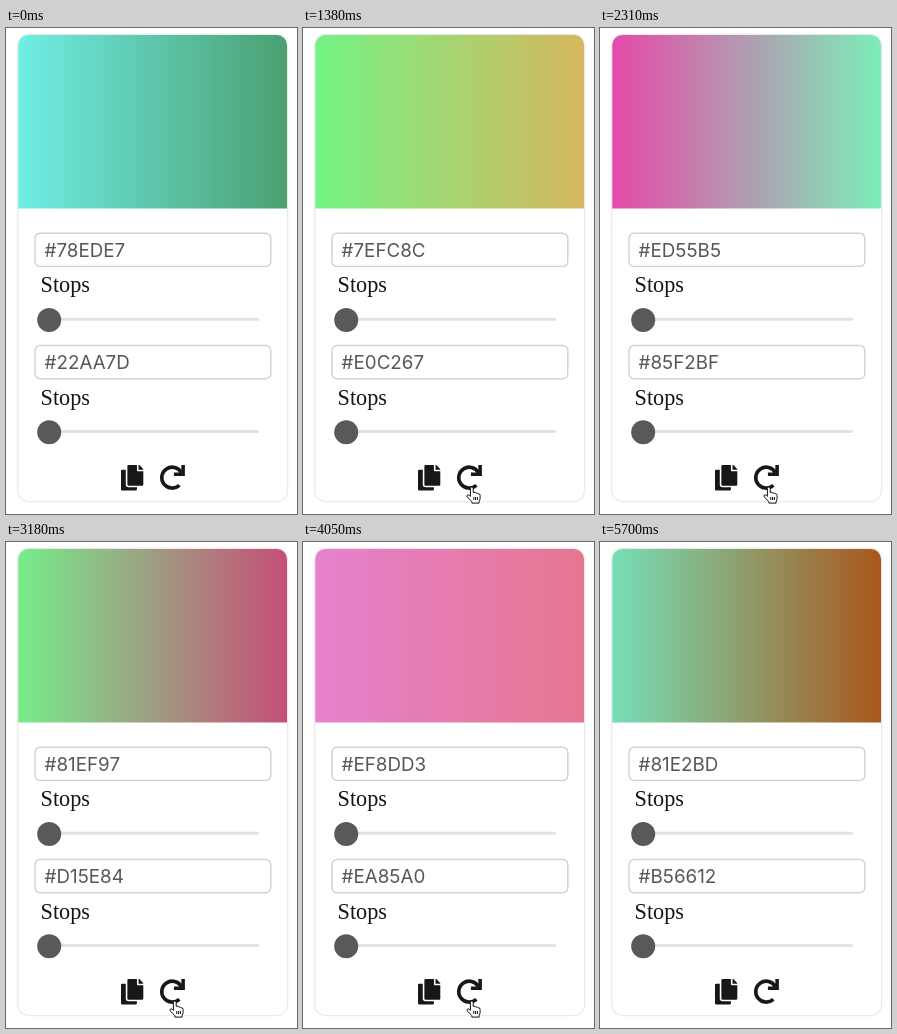
These frames come from a looping animation (291x486 px, 5.76 s). An HTML page:

```html
<!DOCTYPE html>
<html lang="en">
<head>
<meta charset="utf-8">
<title>Gradient generator</title>
<style>
  html, body { margin: 0; width: 100%; height: 100%; overflow: hidden; background: #fff; }
  svg { display: block; }
  .card { fill: #fff; filter: drop-shadow(0 .8px .8px rgba(0, 0, 0, .25)); }
  .field { fill: #fff; stroke: #d2d2d2; stroke-width: 1.4; }
  .hex { font: 18.8px Inter, sans-serif; fill: #575757; }
  .label { font: 22.2px "Liberation Serif", serif; fill: #151515; }
  .track { stroke: #e2e2e2; stroke-width: 3; stroke-linecap: round; }
  .knob { fill: #595959; }
  .icon { fill: #151719; }
  .redo { fill: none; stroke: #151719; stroke-width: 72; }
  .hand { fill: #fff; stroke: #111; stroke-width: 1; stroke-linejoin: round; }
  .arrow { fill: #111; stroke: #fff; stroke-width: 1; stroke-linejoin: round; }
</style>
</head>
<body>
<svg width="291" height="486" viewBox="0 0 291 486">
  <defs>
    <linearGradient id="blend">
      <stop class="stop" offset="0"/>
      <stop class="stop" offset="1"/>
    </linearGradient>
  </defs>

  <rect class="card" x="12.3" y="7" width="268.7" height="466" rx="10"/>
  <path fill="url(#blend)" d="M12.3 180.5V17a10 10 0 0 1 10-10H271a10 10 0 0 1 10 10V180.5z"/>

  <g id="controls">
    <rect class="field" x="29" y="205.2" width="235.8" height="33.2" rx="5"/>
    <text class="hex" x="38.6" y="229.2"></text>
    <text class="label" x="34.6" y="264.3">Stops</text>
    <path class="track" d="M44 291.3H251.5"/>
    <circle class="knob" cx="43.2" cy="292" r="12"/>
  </g>

  <g class="icon" transform="translate(115 437) scale(.0498)">
    <path d="M320 448v40q0 24-24 24H24q-24 0-24-24V120q0-24 24-24h72v296q0 56 56 56z"/>
    <path d="M320 104V0H152q-24 0-24 24v368q0 24 24 24h272q24 0 24-24V128H344q-24 0-24-24z"/>
    <path d="M352 0h6q10 0 17 7l66 66q7 7 7 17v6h-96z"/>
  </g>
  <g class="redo" transform="translate(153.6 437) scale(.0494)">
    <path d="M400 411A212 212 0 1 1 440 152"/>
    <path d="M476 2V188H290"/>
  </g>

  <g id="cursor">
    <g class="hand" transform="translate(-5.9 -.6)">
      <path d="M4.5 9.6V2a1.4 1.4 0 0 1 2.8 0v4q2.3-.8 2.6.7 1.8-.6 2.3.7 2-.3 2 1.6v3q0 1.5-1 3v1.7H6v-1.4L1.3 10.4q-.6-1.9 1-2 1 .2 2.2 1.6z"/>
      <path d="M7.9 10.6v3M9.7 10.6v3M11.5 10.6v3"/>
    </g>
    <path class="arrow" d="M0 0V14.5L3.4 11.4 5.6 16.6 8 15.6 5.8 10.5H10.3z"/>
  </g>
</svg>

<script>
const LOOP = 5760;

// Start time, field values, rendered end colours
const states = [
  [0, "#78EDE7", "#22AA7D", "#70eee6", "#4b9f70"],
  [960, "#7EFC8C", "#E0C267", "#74f384", "#d6b75e"],
  [1830, "#ED55B5", "#85F2BF", "#e64aa9", "#7ceeb8"],
  [2760, "#81EF97", "#D15E84", "#77ec8b", "#c64e77"],
  [3660, "#F4E3B2", "#44CBFC", "#f0dea6", "#4dc3fd"],
  [3930, "#EF8DD3", "#EA85A0", "#e681cf", "#e6768f"],
  [4830, "#81E2BD", "#B56612", "#76dfb7", "#a9571c"]
];

// Time and pointer position
const path = [
  [300, 184, 490], [570, 174, 455], [900, 168.8, 459],
  [4920, 168.8, 459], [5370, 294, 440]
];

const svg = document.querySelector("svg");
const controls = document.getElementById("controls");
const second = controls.cloneNode(true);
second.removeAttribute("id");
second.setAttribute("transform", "translate(0 112.3)");
controls.after(second);

const fields = svg.querySelectorAll(".hex");
const stops = svg.querySelectorAll(".stop");
const cursor = document.getElementById("cursor");
const hand = cursor.querySelector(".hand");
const arrow = cursor.querySelector(".arrow");
const show = (node, on) => node.setAttribute("visibility", on ? "visible" : "hidden");
let current;

function drawState(time) {
  const state = states.findLast(([start]) => start <= time);
  if (state === current) return;
  current = state;
  for (const i of [0, 1]) {
    fields[i].textContent = state[1 + i];
    stops[i].setAttribute("stop-color", state[3 + i]);
  }
}

function drawCursor(time) {
  const next = path.findIndex(([t]) => t > time);
  const visible = next > 0;
  let overIcon = false;
  if (visible) {
    const [t0, x0, y0] = path[next - 1];
    const [t1, x1, y1] = path[next];
    const p = (time - t0) / (t1 - t0);
    const k = p * p * (3 - 2 * p);
    const x = x0 + (x1 - x0) * k;
    const y = y0 + (y1 - y0) * k;
    overIcon = x < 180 && y < 463;
    cursor.setAttribute("transform", `translate(${x} ${y})`);
  }
  show(hand, visible && overIcon);
  show(arrow, visible && !overIcon);
}

const origin = performance.now();
function frame() {
  const time = (performance.now() - origin) % LOOP;
  drawState(time);
  drawCursor(time);
  requestAnimationFrame(frame);
}
frame();
</script>
</body>
</html>
```
